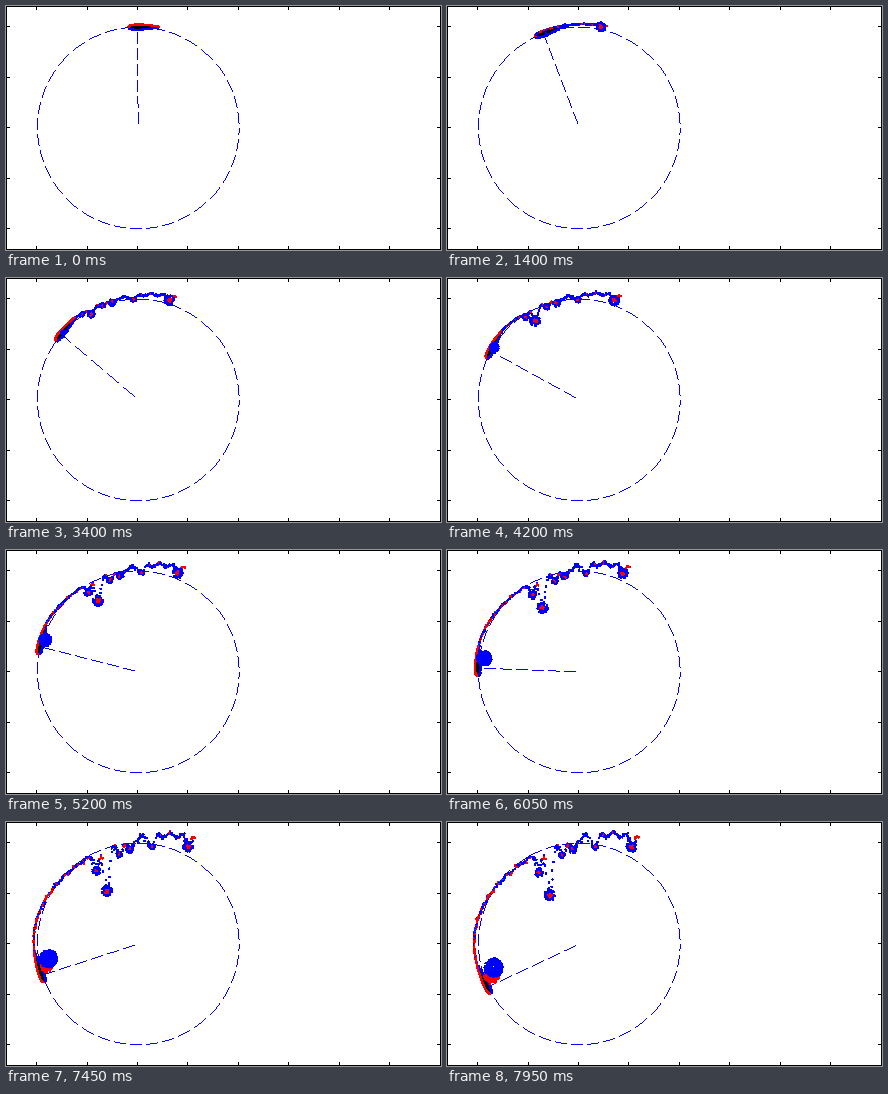
Recreate the animation shown at these times as a matplotlib script. Size 435 px wide and 244 px high, loop 8000 ms.

```python
import numpy as np
import matplotlib.pyplot as plt
from matplotlib.animation import FuncAnimation

W, H, DPI = 435, 244, 64
FRAMES, STEP = 160, 50
PX = 72 / DPI                      # one pixel in points
CX, CY, R = 131.3, 121.9, 100.8    # rotor path
CHORD = 29.5
RED, BLUE = (1, 0, 0), (0, 0, 1)
rng = np.random.default_rng(4)

# Rolled-up vortices: shed time, radius, speed of sinking into the circle
VORTICES = [(.2, 5, 1.4), (1.37, 3, 1.6), (2.07, 3.6, 1.8), (2.4, 3.4, 1.8),
            (2.8, 5.4, 8.7), (3.15, 4.2, 4)]


def body(t, back, inward):
    """Point given along the chord and towards the hub, from quarter chord."""
    a = np.radians(14.4 * t)
    c, s = np.cos(a), np.sin(a)
    x = CX - R * s + back * c + inward * s
    y = CY - R * c - back * s + inward * c
    return np.column_stack(np.broadcast_arrays(x, y))


def flow(s, t):
    """Position at time t of fluid shed from the trailing edge at time s."""
    s = np.atleast_1d(s)
    vx = 4.7 * np.cos((s - .6) / 3.6)
    vy = -.9 + .35 * np.sin(2 * np.pi * s / .45)
    for centre, _, sink in VORTICES:
        vy = vy + sink * np.exp(-((s - centre) / .12) ** 2)
    drift = np.column_stack([vx, vy]) * (t - s)[:, None]
    return body(s, .74 * CHORD, 0) + drift


def disk(n):
    r, a = np.sqrt(rng.random(n)), rng.random(n) * 2 * np.pi
    return np.column_stack([r * np.cos(a), r * np.sin(a)])


def spin(p, a):
    c, s = np.cos(a), np.sin(a)
    return p @ np.array([[c, -s], [s, c]])


def tint(red):
    return np.where(np.asarray(red)[:, None], RED, BLUE)


def half_thickness(u):
    """NACA 0015 profile."""
    return 5 * .15 * CHORD * (.2969 * np.sqrt(u) - .126 * u - .3516 * u**2
                              + .2843 * u**3 - .1036 * u**4)


def dashes(x, y, off=4, period=16):
    """Pixels of a stippled line, one per step in its steeper direction."""
    run = np.maximum(abs(np.diff(x)), abs(np.diff(y)))
    run = np.concatenate([[0], np.cumsum(run)])
    n = np.arange(int(run[-1]) + 1)
    n = n[n % period >= off]
    px, py = np.interp(n, run, x), np.interp(n, run, y)
    return np.floor(px) + .5, np.floor(py) + .5


# Fixed random features of every dot
shed = np.arange(FRAMES * 3) * STEP / 3000
wake_noise = rng.normal(size=(len(shed), 2))
wake_red = (rng.random(len(shed)) < .12 + .8 * (shed / 8) ** 3) | (shed < .08)
rolls = [(s, r, disk(int(2.6 * r * r))) for s, r, _ in VORTICES]
early, lev, under = disk(30), disk(300), disk(110)
skin = np.linspace(0, 1, 34) ** 1.4
skin_mix, skin_noise = rng.random((2, len(skin)))


def wake(t):
    on = shed < t
    s = shed[on]
    age = t - s
    # the sheet gathers into evenly spaced knots as it ages
    pull, gap = .8 * np.clip(age / 2, 0, 1), .28
    knot = s - pull * gap / (2 * np.pi) * np.sin(2 * np.pi * s / gap)
    spread = .1 + .15 * np.minimum(age, 5)
    pts = flow(np.clip(knot, 0, t), t) + wake_noise[on] * spread[:, None]
    return pts, tint(wake_red[on])


def vortex(t, s, r, pts):
    age = t - s
    size = r * (.4 + .6 * min(1, age / 1.5))
    return flow(s, t) + spin(pts, 1.5 * age) * size, tint(np.hypot(*pts.T) < .42)


def blob(t, pts, back, inward, r, red=False):
    return body(t, back, inward) + spin(pts, 1.2 * t) * r, tint(np.full(len(pts), red))


def surface(t):
    back = (skin - .25) * CHORD
    h = half_thickness(skin) + .4
    red = 1 - .55 * np.exp(-((t - 1.2) / .6) ** 2)
    lift = skin_noise * min(1.2, .2 + .5 * t)
    return [(body(t, back, h + lift), tint(skin_mix < 0)),
            (body(t, back, -h), tint(skin_mix < red))]


def dots(t):
    parts = [wake(t)]
    parts += [vortex(t, *v) for v in rolls if t > v[0]]
    parts += surface(t)
    if 1.2 < t <= 2.8:
        k = (t - 1.2) / 1.6
        parts.append(blob(t, early, 21 * k, 2.2, 1 + 1.2 * k))
    if t > 3.2:
        k = (t - 3.2) / 4.8
        back, inward = 3 + 11.5 * k, 1 + 13.2 * k ** 1.8
        if t > 6.7:
            parts.append(blob(t, under, back * .5, inward * .6, 3 + 3.4 * (t - 6.7), True))
        parts.append(blob(t, lev, back, inward, 9.3 * k ** .5))
    return [np.concatenate(p) for p in zip(*parts)]


fig = plt.figure(figsize=(W / DPI, H / DPI), dpi=DPI, facecolor="white")
ax = fig.add_axes([0, 0, 1, 1])
ax.set(xlim=(0, W), ylim=(H, 0))
ax.axis("off")


def box(x, y, w, h):
    ax.add_patch(plt.Rectangle((x, y), w, h, fc="black", lw=0,
                               antialiased=False, zorder=5))


def pixels(x, y):
    return ax.plot(x, y, ",", color="blue", antialiased=False, zorder=1)[0]


for edge in [(0, 0, W, 1), (0, H - 1, W, 1), (0, 0, 1, H), (W - 1, 0, 1, H)]:
    box(*edge)
TICK = 4
for i in range(8):
    x = int(30.7 + 50.4 * i)
    box(x, 0, 1, TICK)
    box(x, H - TICK, 1, TICK)
for i in range(5):
    y = int(20.9 + 50.4 * i)
    box(0, y, TICK, 1)
    box(W - TICK, y, TICK, 1)

turn = np.linspace(0, 2 * np.pi, 2400)
pixels(*dashes(CX + R * np.cos(turn), CY - R * np.sin(turn)))
arm = pixels([], [])
foil = ax.add_patch(plt.Polygon([(0, 0), (1, 0), (1, 1)], fc="black", lw=0,
                                antialiased=False, zorder=2))
cloud = ax.scatter([], [], s=(1.4 * PX) ** 2, linewidths=0, antialiaseds=False,
                   zorder=3)


def draw(i):
    t = (i + 1) * STEP / 1000
    k = np.linspace(0, 1, 400)
    hub = body(t, 0, 0)[0]
    arm.set_data(*dashes(CX + (hub[0] - CX) * k, CY + (hub[1] - CY) * k))
    u = np.linspace(0, 1, 30) ** 2
    h = half_thickness(u)
    edge = np.concatenate([u, u[::-1]])
    foil.set_xy(body(t, (edge - .25) * CHORD, np.concatenate([h, -h[::-1]])))
    pts, cols = dots(t)
    cloud.set_offsets(pts)
    cloud.set_facecolor(cols)
    return arm, foil, cloud


anim = FuncAnimation(fig, draw, frames=FRAMES, interval=STEP, repeat=True,
                     repeat_delay=0, blit=False)
plt.show()
```
